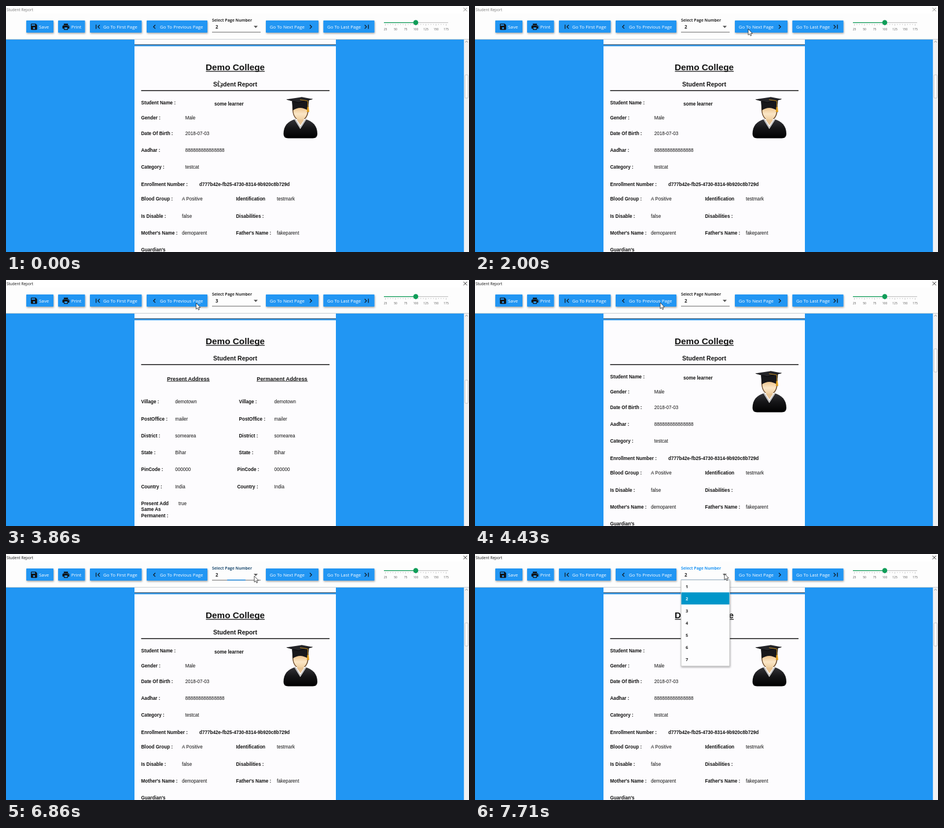
Recreate the animation shown at these times as an HTML page. Size 800x425 px, loop 8000 ms.

```html
<!DOCTYPE html>
<html lang="en">
<head>
<meta charset="utf-8">
<title>Student Report</title>
<style>
html, body { margin: 0; height: 100%; overflow: hidden; background: #fff; }
svg { display: block; width: 100vw; height: 100vh; }
text { white-space: pre; }
.ui { font-family: "Open Sans", "Noto Sans", sans-serif; font-size: 7.9px; }
.doc { font-family: "Liberation Sans", Arial, sans-serif; font-size: 8.15px; fill: #111; }
.b { font-weight: 700; }
.mid { text-anchor: middle; }
</style>
</head>
<body>
<svg viewBox="0 0 800 425" xmlns="http://www.w3.org/2000/svg">
  <defs>
    <filter id="shadow" x="-10%" y="-20%" width="120%" height="160%">
      <feDropShadow dx="0.7" dy="1.6" stdDeviation="1.5" flood-opacity="0.36"/>
    </filter>
    <linearGradient id="skin" x1="0" y1="0" x2="0" y2="1">
      <stop offset="0" stop-color="#e9bd83"/>
      <stop offset="0.55" stop-color="#fbe6c6"/>
      <stop offset="1" stop-color="#efd0a2"/>
    </linearGradient>
    <linearGradient id="gown" x1="0" y1="0" x2="0" y2="1">
      <stop offset="0" stop-color="#35353a"/>
      <stop offset="0.45" stop-color="#161618"/>
      <stop offset="1" stop-color="#000"/>
    </linearGradient>
  </defs>

  <rect width="800" height="425" fill="#fdfdfd"/>
  <rect width="800" height="12.5" fill="#fff"/>
  <rect y="57" width="800" height="1" fill="#c9cdd1"/>
  <rect y="58" width="791.5" height="367" fill="#2196f3"/>

  <!-- report sheets -->
  <rect x="222" y="58" width="348" height="8" fill="#fdfcfe"/>
  <rect x="222" y="66" width="348" height="1.6" fill="#5d7488"/>
  <rect x="222" y="69.5" width="348" height="356" fill="#fdfcfe"/>
  <g class="doc b mid">
    <text x="396" y="111" font-size="15.3">Demo College</text>
    <text x="396" y="139" font-size="10.5">Student Report</text>
  </g>
  <path d="M345.5 112.8H447" stroke="#111" stroke-width="1.3"/>
  <path d="M233.5 146.3H559" stroke="#151515" stroke-width="1.4"/>

  <g id="details">
    <g id="graduate">
      <path d="M495 172Q493.500 188 501 195L508.500 200 517 195Q524.500 187 522.500 172Z" fill="#6b4a2c"/>
      <path d="M479.500 221C479.500 207 487 199 500 195.500H517C530 199 538 207 538 221Q538 228.500 530 228.500H487.500Q479.500 228.500 479.500 221Z" fill="url(#gown)"/>
      <path d="M499.500 195L508.500 210 518 195Z" fill="#f7f5f3"/>
      <path d="M503 190V197.500L508.700 206 514.500 197.500V190Z" fill="#e8c596"/>
      <path d="M496.300 174C495.500 187 500 196.500 508.800 196.500S522 187 521.300 174Z" fill="url(#skin)"/>
      <path d="M499 196L508.500 211.500 518.300 196" fill="none" stroke="#eee" stroke-width="1.1"/>
      <path d="M494 164.500L495.500 180.500Q508 171.500 521.800 180.500L523.500 163Z" fill="#17171a"/>
      <path d="M485 161.300L511 157.300 529.500 160.700 505 167Z" fill="#242428"/>
      <path d="M485 161.300L505 167 529.500 160.700" fill="none" stroke="#08080a"/>
      <path d="M508 161.800L521.500 164V176" fill="none" stroke="#d99a20" stroke-width="0.9"/>
      <path d="M520.500 174.500H523L524 183H519.800Z" fill="#e0a020"/>
    </g>
  </g>
  <g id="address">
    <path d="M278 175H352M433 175H521.500" stroke="#111" stroke-width="0.9"/>
  </g>

  <!-- scroll bar -->
  <rect x="791.5" y="58" width="8.500" height="367" fill="#f1f1f2"/>
  <path d="M793.500 63L795.700 60.500 797.900 63" fill="none" stroke="#888" stroke-width="0.9"/>
  <rect id="thumb" x="793" width="5.400" height="40" rx="1.500" fill="#fafafa" stroke="#b5b5b8" stroke-width="0.8"/>

  <!-- window title -->
  <g id="caption">
    <text class="ui" x="1" y="9.3" font-size="6.5" style="font-size:6.5px" fill="currentColor">Student Report</text>
    <path d="M790.500 3L796.700 9.200M796.700 3L790.500 9.200" stroke="currentColor" stroke-width="0.9"/>
  </g>

  <g id="buttons"></g>

  <!-- page picker -->
  <g class="ui b">
    <text id="label" x="356" y="27" style="font-size:6.9px">Select Page Number</text>
    <text id="number" x="362" y="38.700" fill="#222"></text>
  </g>
  <path d="M428 34.200H435L431.500 37.900Z" fill="#555"/>
  <path d="M356 45.200H440" stroke="#555" stroke-width="0.9"/>
  <path id="focus" stroke="#2196f3" stroke-width="1.400"/>

  <!-- zoom slider -->
  <path d="M653 28.600H764" stroke="#c4c4c4" stroke-width="1.300"/>
  <path d="M653 28.600H708" stroke="#0f9d58" stroke-width="1.300"/>
  <g id="scale" class="ui mid" style="font-size:5px" fill="#555"></g>
  <circle cx="708" cy="28.600" r="4.300" fill="#0f9d58"/>

  <g id="menu" class="ui b" style="font-size:7.3px">
    <rect x="356" y="44.800" width="84" height="149" fill="#fdfdfe" stroke="#b4b4b4" stroke-width="0.8" filter="url(#shadow)"/>
    <rect x="356.500" y="66.300" width="83" height="20.900" fill="#0096c9"/>
  </g>

  <path id="cursor" d="M0 0V10.600L2.400 8.400 4 12 5.700 11.200 4.200 7.800H7.400Z" fill="#fff" stroke="#222" stroke-width="0.8" stroke-linejoin="round"/>
</svg>

<script>
const LOOP = 8000, RATE = 7;
const $ = id => document.getElementById(id);

function add(parent, tag, attrs, content) {
  const el = document.createElementNS("http://www.w3.org/2000/svg", tag);
  for (const key in attrs) el.setAttribute(key, attrs[key]);
  if (content !== undefined) el.textContent = content;
  parent.appendChild(el);
  return el;
}

const write = (parent, x, y, content, bold) =>
  add(parent, "text", { x, y, class: bold ? "doc b" : "doc" }, content);

function field(parent, y, x, label, valueX, value, boldValue) {
  write(parent, x, y, label, true);
  if (value) write(parent, valueX, y, value, boldValue);
}

function buildDetails() {
  const g = $("details");
  write(g, 233.5, 170, "Student Name :", true);
  write(g, 360, 172.2, "some learner", true);
  field(g, 195.7, 233.5, "Gender :", 309.7, "Male");
  field(g, 222.5, 233.5, "Date Of Birth :", 309.7, "2018-07-03");
  field(g, 251.8, 233.5, "Aadhar :", 309.7, "888888888888888");
  field(g, 281.2, 233.5, "Category :", 309.7, "testcat");
  field(g, 310.5, 233.5, "Enrollment Number :", 334, "d777b42e-fb25-4730-8314-9b920c8b729d", true);
  field(g, 336.2, 233.5, "Blood Group :", 304, "A Positive");
  field(g, 336.2, 397.5, "Identification", 468, "testmark");
  field(g, 365.5, 233.5, "Is Disable :", 304, "false");
  field(g, 365.5, 397.5, "Disabilities :");
  field(g, 394.8, 233.5, "Mother's Name :", 304, "demoparent");
  field(g, 394.8, 397.5, "Father's Name :", 468, "fakeparent");
  write(g, 233.5, 424, "Guardian's", true);
}

function buildAddress() {
  const g = $("address");
  for (const [x, title] of [[315, "Present Address"], [477, "Permanent Address"]])
    add(g, "text", { x, y: 173.5, class: "doc b mid", style: "font-size:9.3px" }, title);
  const rows = [
    ["Village", "demotown", 402.5], ["PostOffice", "mailer", 402.5],
    ["District", "somearea", 402.5], ["State", "Bihar", 402.5],
    ["PinCode", "000000", 399.5], ["Country", "India", 399.5]
  ];
  rows.forEach(([name, value, x], i) => {
    const y = 213.3 + i * 29.25;
    field(g, y, 233.5, name + " :", 292.2, value);
    field(g, y, x, name + " :", 463.5, value);
  });
  ["Present Add", "Same As", "Permanent :"].forEach((line, i) =>
    write(g, 233.5, 388.8 + i * 10.5, line, true));
  write(g, 298, 388.8, "true");
}

// x, width, text x, label, icon x, icon outline on a 24-unit grid
const buttons = [
  [35, 47, 57, "Save", 41.2, "M17 3H5c-1.100 0-2 .9-2 2v14c0 1.100.9 2 2 2h14c1.100 0 2-.9 2-2V7zM12 19a3 3 0 1 1 0-6 3 3 0 0 1 0 6zM15 9H5V5h10z"],
  [90, 46.5, 112.7, "Print", 96.3, "M19 8H5a3 3 0 0 0-3 3v6h4v4h12v-4h4v-6a3 3 0 0 0-3-3zM16 19H8v-5h8zM19 12a1 1 0 1 1 0-2 1 1 0 0 1 0 2zM18 3H6v4h12z"],
  [145, 89.5, 168, "Go To First Page", 151.4, "M18.400 16.600L13.800 12l4.600-4.600L17 6l-6 6 6 6zM6 6h2v12H6z"],
  [243, 105, 266, "Go To Previous Page", 249.2, "M15.400 7.400L14 6l-6 6 6 6 1.400-1.400L10.800 12z"],
  [449, 91, 455.7, "Go To Next Page", 519.4, "M10 6L8.600 7.400 13.200 12l-4.600 4.600L10 18l6-6z"],
  [548.3, 88.3, 555, "Go To Last Page", 616, "M5.600 7.400L10.200 12l-4.600 4.600L7 18l6-6-6-6zM16 6h2v12h-2z"]
];

function buildControls() {
  for (const [x, width, textX, label, iconX, d] of buttons) {
    const g = $("buttons");
    add(g, "rect", { x, y: 25, width, height: 21, rx: 0.8, fill: "#2196f3", filter: "url(#shadow)" });
    add(g, "path", { d, transform: `translate(${iconX} 28.7) scale(.6)`, fill: "#101418", "fill-rule": "evenodd" });
    add(g, "text", { x: textX, y: 38.5, class: "ui", fill: "#fff" }, label);
  }
  for (let i = 0; i <= 24; i++) {
    const x = 655.5 + i * 4.375, major = i % 4 === 0;
    add($("scale"), "path", { d: `M${x} 31v${major ? 3 : 1.8}`, stroke: "#aaa", "stroke-width": 0.6 });
    if (major) add($("scale"), "text", { x, y: 41.7 }, 25 + i / 4 * 25);
  }
  for (let n = 1; n <= 7; n++)
    add($("menu"), "text", { x: 364, y: 37.6 + n * 21, fill: n === 2 ? "#fff" : "#222" }, n);
}

// pointer stops: tick, x, y
const path = [
  [0, 367, 129], [1, 369, 126], [4, 369, 126], [10, 444, 50], [13, 472, 40],
  [19, 473, 35], [20, 473, 35], [28, 322, 40], [31, 320, 39], [33, 320, 39],
  [39, 494, 71], [46, 430, 38], [48, 429, 38], [54, 431, 34]
];

function pointer(tick) {
  const i = path.findIndex(stop => stop[0] >= tick);
  if (i <= 0) return path[0].slice(1);
  const [t0, x0, y0] = path[i - 1], [t1, x1, y1] = path[i];
  const u = (tick - t0) / (t1 - t0), k = u * u * (3 - 2 * u);
  return [x0 + (x1 - x0) * k, y0 + (y1 - y0) * k];
}

const mix = (a, b, k) => `rgb(${a.map((v, i) => Math.round(v + (b[i] - v) * k))})`;
const show = (id, on) => { $(id).style.display = on ? "" : "none"; };

function draw(time) {
  // the screen refreshes seven times a second
  const tick = Math.min(54, Math.floor((time % LOOP + 5) * RATE / 1000));
  const third = tick >= 17 && tick < 30;
  const focus = Math.max(0, Math.min(1, (tick * 1000 / RATE - 6797) / 160));

  show("details", !third);
  show("address", third);
  show("menu", tick >= 53);
  $("thumb").setAttribute("y", third ? 173 : 119);
  $("number").textContent = third ? 3 : 2;
  $("caption").style.color = tick >= 16 ? "#111" : "#777";
  $("label").setAttribute("fill", mix([45, 45, 45], [33, 150, 243], focus));
  $("focus").setAttribute("d", focus ? `M${398 - 42 * focus} 45H${398 + 42 * focus}` : "");
  $("cursor").setAttribute("transform", `translate(${pointer(tick)})`);
}

buildDetails();
buildAddress();
buildControls();

const start = performance.now();
(function loop() {
  draw(performance.now() - start);
  requestAnimationFrame(loop);
})();
</script>
</body>
</html>
```
